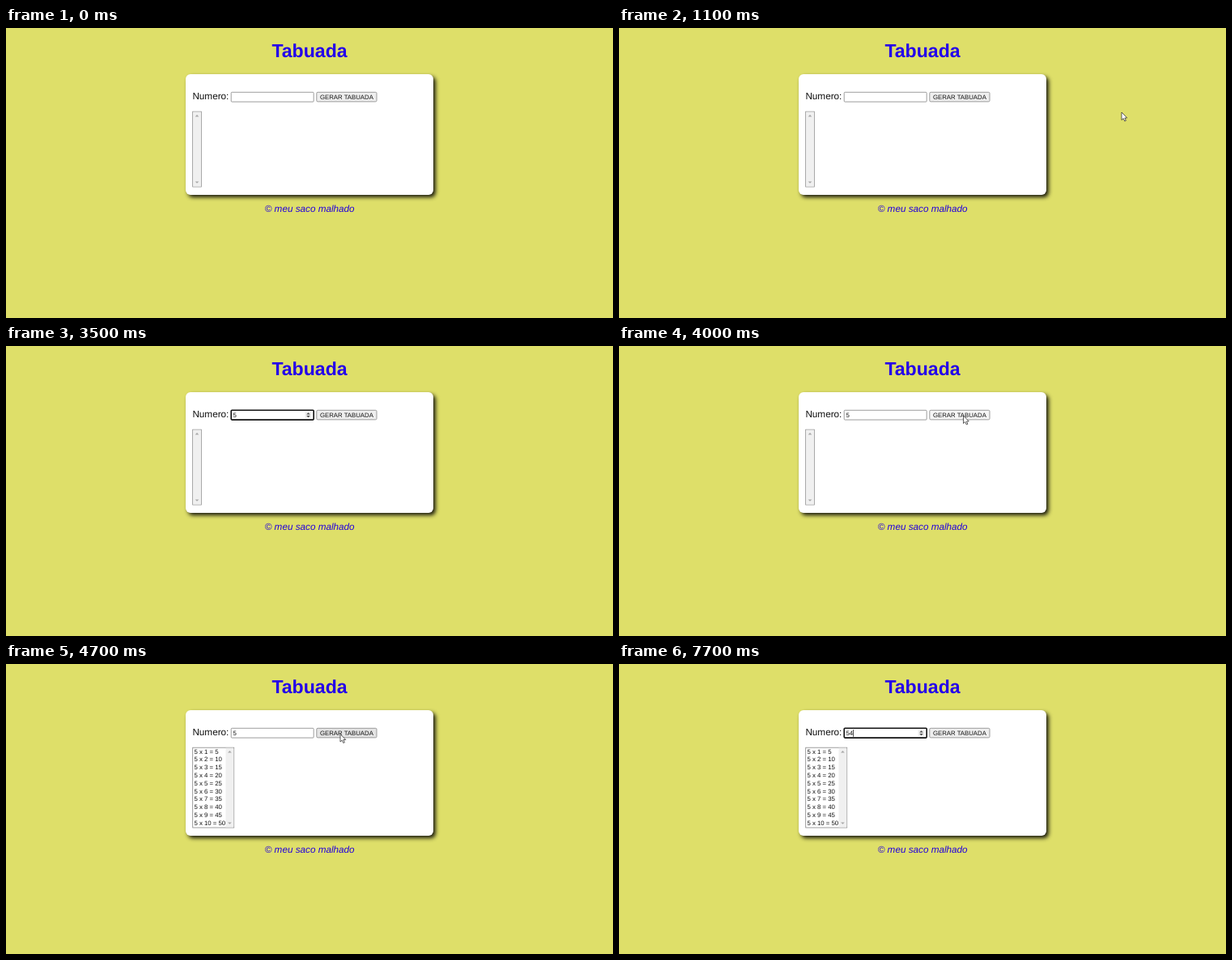
Write an HTML page that moves like this. It is 750 by 358 pixels and loops after 8 s.

```html
<!DOCTYPE html>
<html lang="pt">
<head>
<meta charset="utf-8">
<title>Tabuada</title>
<style>
  html, body { margin: 0; width: 100%; height: 100%; overflow: hidden; background: #dedf69; }
  #card {
    position: absolute; left: 222px; top: 57px; width: 306px; height: 148.5px;
    border-radius: 5.9px; background: #fff; box-shadow: 2.9px 2.9px 5.3px rgba(0, 0, 0, .88);
  }
  svg { position: absolute; left: 0; top: 0; }
  text {
    font: 7.81px "Liberation Sans", Arial, sans-serif; fill: #111;
    text-rendering: geometricPrecision; white-space: pre;
  }
  .title { font-size: 23.1px; font-weight: bold; fill: #2300ea; text-anchor: middle; }
  .footer { font-size: 11.72px; font-style: italic; fill: #2300dc; text-anchor: middle; }
  .label { font-size: 11.72px; }
  .box { fill: #fff; stroke: #858585; stroke-width: .8; }
  .arrow { fill: #a6a6a6; }
</style>
</head>
<body>
<div id="card"></div>
<svg width="750" height="358" viewBox="0 0 750 358">
  <text class="title" x="375" y="36.4">Tabuada</text>
  <text class="label" x="230.4" y="88">Numero:</text>

  <rect id="field" class="box" x="278.2" y="79.3" width="102" height="11.8" rx="1"/>
  <rect id="selection" x="280.2" y="81" width="5" height="8.8" fill="#2f87e8"/>
  <text id="value" x="280.4" y="88"></text>
  <rect id="caret" y="81" width=".8" height="8.8" fill="#222"/>
  <g id="spinner">
    <rect x="369.5" y="81.5" width="8" height="7.5" fill="#ededed"/>
    <path d="M371.2 84.5l2.3-2.3 2.3 2.3zM371.2 85.9l2.3 2.3 2.3-2.3z" fill="#484848"/>
  </g>

  <rect id="button" class="box" x="383.8" y="79.3" width="74.2" height="11.6" rx="1.4"/>
  <text x="420.9" y="87.9" text-anchor="middle">GERAR TABUADA</text>

  <rect id="list" class="box" x="230.7" y="103.2"/>
  <rect id="bar" y="103.7" width="9.8" fill="#f0f0f0"/>
  <path id="up" class="arrow" d="M-2.3 1.2L0-1.1 2.3 1.2z"/>
  <path id="down" class="arrow" d="M-2.3-1.2L0 1.1 2.3-1.2z"/>
  <g id="rows"></g>

  <text id="footer" class="footer" x="375.2">© meu saco malhado</text>
  <path id="cursor" d="M0 0V9.6L2.2 7.6 3.8 11 5.4 10.3 3.9 7H6.8Z"
        fill="#fff" stroke="#333" stroke-width=".8"/>
</svg>
<script>
  const LOOP = 8000, STEP = 100;
  const $ = id => document.getElementById(id);
  const set = (id, attrs) => {
    for (const name in attrs) $(id).setAttribute(name, attrs[name]);
  };
  const show = (id, on) => set(id, { visibility: on ? "visible" : "hidden" });
  const within = (t, ...spans) => spans.some(([from, to]) => t >= from && t < to);

  // Visible stretches of the pointer: [time, x, y]
  const paths = [
    [[500, 693, 152], [800, 672, 132], [1100, 621, 104], [1200, 535, 96], [1300, 411, 88], [1399, 411, 88]],
    [[3600, 388, 89], [3900, 425.5, 86], [4400, 425.5, 86], [4700, 413, 86.5], [4800, 390, 86], [4899, 390, 86]],
    [[5700, 213, 81], [7699, 213, 81]]
  ];

  function pointerAt(t) {
    const path = paths.find(p => t >= p[0][0] && t <= p[p.length - 1][0]);
    if (!path) return null;
    const i = path.findIndex((p, k) => k > 0 && t <= p[0]);
    const [t0, x0, y0] = path[i - 1], [t1, x1, y1] = path[i];
    const k = (t - t0) / (t1 - t0);
    return { x: x0 + (x1 - x0) * k, y: y0 + (y1 - y0) * k };
  }

  for (let n = 1; n <= 10; n++) {
    const row = document.createElementNS("http://www.w3.org/2000/svg", "text");
    row.setAttribute("x", 232.4);
    row.setAttribute("y", 100.7 + n * 9.8);
    row.textContent = `5 x ${n} = ${5 * n}`;
    $("rows").append(row);
  }

  function drawList(filled) {
    const width = filled ? 51 : 10.6, height = filled ? 98.8 : 92.8;
    const middle = 230.7 + width - 5.3;
    set("list", { width, height });
    set("bar", { x: middle - 4.9, height: height - 1 });
    set("up", { transform: `translate(${middle} 108.2)` });
    set("down", { transform: `translate(${middle} ${height + 97.8})` });
    show("rows", filled);
    $("card").style.height = (filled ? 154.5 : 148.5) + "px";
    set("footer", { y: filled ? 233.4 : 227.4 });
  }

  function draw(t) {
    const pointer = pointerAt(t);
    const focused = within(t, [1700, 4000], [5400, LOOP]);
    const selected = within(t, [5500, 7400]);
    const value = t < 2800 ? "" : t < 7700 ? "5" : "54";

    $("field").style.cssText = focused ? "stroke:#111;stroke-width:1.6" : "";
    $("value").textContent = value;
    $("value").style.fill = selected ? "#fff" : "";
    show("selection", selected);
    show("spinner", within(t, [1400, 4000], [4900, LOOP]));
    show("caret", within(t, [1700, 2200], [2700, 3400], [5400, 5500], [7400, LOOP]));
    set("caret", { x: 280.4 + value.length * 4.34 });

    const hovered = pointer && pointer.x > 383 && pointer.x < 458 && pointer.y < 91;
    $("button").style.fill = within(t, [4000, 4100]) ? "#f6f6f6" : hovered ? "#e4e4e4" : "#efefef";

    drawList(t >= 4100);
    show("cursor", !!pointer);
    if (pointer) set("cursor", { transform: `translate(${pointer.x} ${pointer.y})` });
  }

  const start = performance.now();
  function tick() {
    const t = (performance.now() - start) % LOOP;
    draw(Math.floor(t / STEP) * STEP);
    requestAnimationFrame(tick);
  }
  tick();
</script>
</body>
</html>
```
